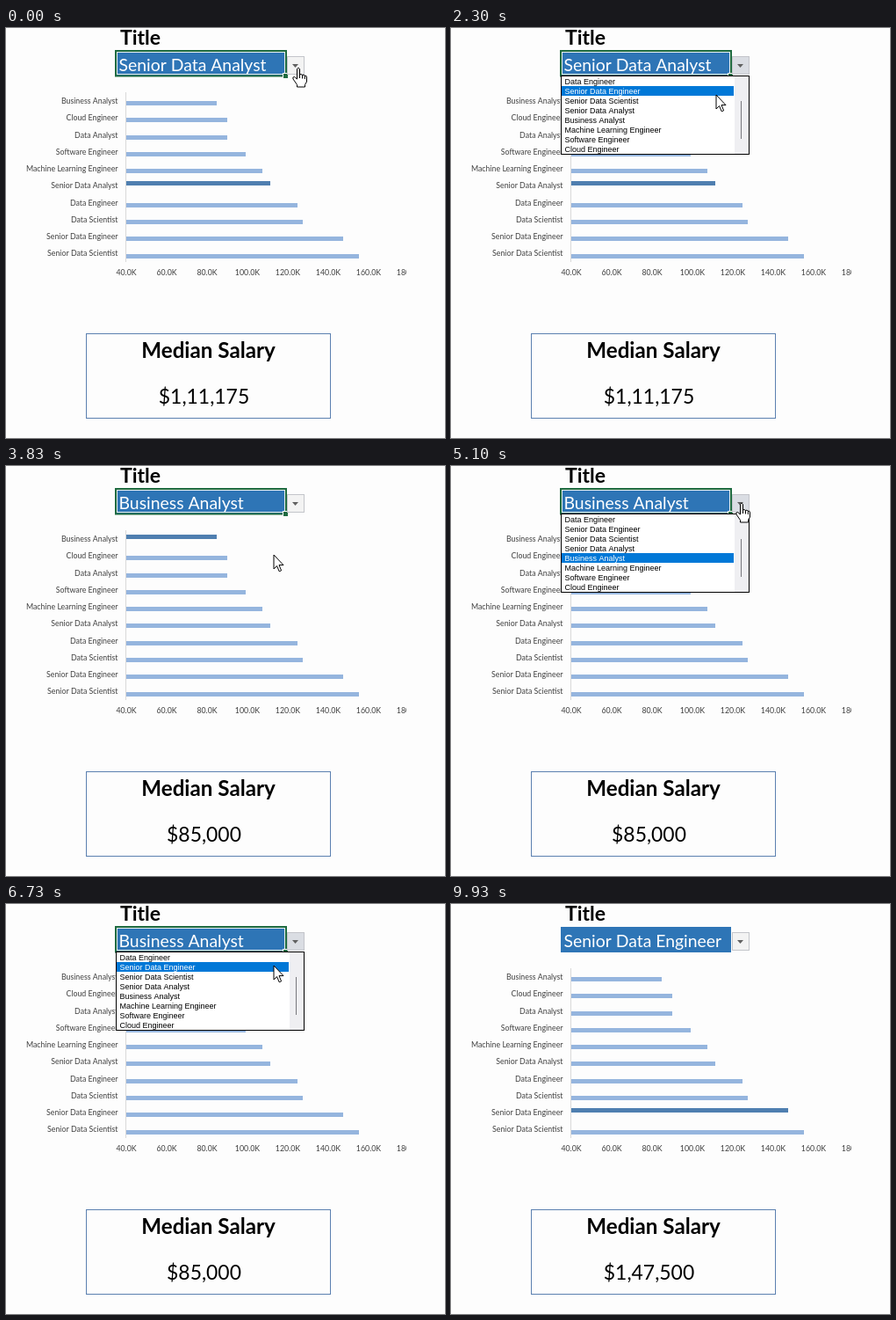
Write an HTML page with a canvas that moves like this. It is 500 px wide and 466 px high and loops after 9960 ms.

```html
<!DOCTYPE html>
<html lang="en">
<head>
<meta charset="utf-8">
<title>Median salary by title</title>
<style>
  html, body { margin: 0; width: 100%; height: 100%; overflow: hidden; background: #fdfdfd; }
  canvas { display: block; }
</style>
</head>
<body>
<canvas id="stage" width="500" height="466"></canvas>
<script>
const ctx = document.getElementById('stage').getContext('2d');
const LOOP = 9960;
const PAPER = '#fdfdfd';
const GREEN = '#1f6b41';
const SANS = 'Lato, sans-serif';
const LIST_FONT = '9px "Liberation Sans", Arial, sans-serif';

// Salaries in thousands, in chart order
const salaries = {
  'Business Analyst': 85, 'Cloud Engineer': 90, 'Data Analyst': 90,
  'Software Engineer': 99.2, 'Machine Learning Engineer': 107.5,
  'Senior Data Analyst': 111.175, 'Data Engineer': 125, 'Data Scientist': 127.5,
  'Senior Data Engineer': 147.5, 'Senior Data Scientist': 155
};
const options = ['Data Engineer', 'Senior Data Engineer', 'Senior Data Scientist',
  'Senior Data Analyst', 'Business Analyst', 'Machine Learning Engineer',
  'Software Engineer', 'Cloud Engineer'];

// Pointer stops: time, x, y
const pointerPath = [
  [0, 333, 45], [1000, 333, 45], [1700, 302, 76], [2500, 302, 76], [3000, 305, 101],
  [4200, 305, 101], [4700, 331, 42], [5500, 331, 42], [6100, 305, 70],
  [8200, 305, 70], [8800, 385, -25], [LOOP, 385, -25]
];
const openSpans = [[700, 3300], [4850, 7200]];
const blurTime = 9400;

const handShape = new Path2D('M-1.5 1.5Q0 -1 1.5 1.5V8Q3 6.8 4.5 8.5Q6 7.6 7.3 9.2Q9.5 8.6 9.5 11V16L7.5 19.5V22H-1.5V19.5L-6 13Q-7 10.5 -4.5 10.5L-1.5 13Z');
const handLines = new Path2D('M1.5 8V12M4.5 8.5V12.5M7.3 9.2V13');
const arrowShape = new Path2D('M0 0V16L3.6 12.6L6.2 18.8L8.6 17.8L6 11.6H11Z');

function rect(x, y, w, h, color) {
  ctx.fillStyle = color;
  ctx.fillRect(x, y, w, h);
}

function frame(x, y, w, h, color, width = 1) {
  ctx.strokeStyle = color;
  ctx.lineWidth = width;
  ctx.strokeRect(x, y, w, h);
}

function text(str, x, y, font, align = 'left', color = '#000') {
  ctx.font = font;
  ctx.textAlign = align;
  ctx.fillStyle = color;
  ctx.fillText(str, x, y);
}

function pointerAt(t) {
  const i = pointerPath.findIndex(p => p[0] > t);
  const [t0, x0, y0] = pointerPath[i - 1], [t1, x1, y1] = pointerPath[i];
  const u = (t - t0) / (t1 - t0), e = u * u * (3 - 2 * u);
  return { x: x0 + (x1 - x0) * e, y: y0 + (y1 - y0) * e };
}

function drawChart(selected) {
  rect(136, 73, 1, 193, '#d9d9d9');
  Object.entries(salaries).forEach(([name, value], i) => {
    const active = name === selected;
    text(name, 127.5, 86.2 + 19.23 * i, '8.8px ' + SANS, 'right', '#404040');
    rect(137, Math.round(82.95 + 19.3 * i) - (active ? 5 : 0), Math.round(2.3 * (value - 40)), 5,
      active ? '#4f7fb0' : '#95b5de');
  });
  ctx.save();
  ctx.beginPath();
  ctx.rect(0, 266, 456, 24);
  ctx.clip();
  for (let k = 40; k <= 180; k += 20)
    text(k.toFixed(1) + 'K', 137 + 2.3 * (k - 40), 281.3, '8.8px ' + SANS, 'center', '#404040');
  ctx.restore();
}

function drawCell(selected, open, focused) {
  rect(125, 26, 194, 29, '#2e75b6');
  if (focused) {
    frame(126.5, 27.5, 191, 25, '#e8f0ee');
    frame(125, 26, 194, 28.5, GREEN, 2);
    rect(315, 51, 6, 6, PAPER);
    rect(316, 52, 5, 5, GREEN);
  }
  text(selected, 128.5, 49, '19.4px ' + SANS, 'left', '#fff');

  rect(320, 32, 20, 21, open ? '#dadde3' : '#f3f3f3');
  frame(320.5, 32.5, 19, 20, '#c3c5ca');
  ctx.fillStyle = '#606060';
  ctx.beginPath();
  ctx.moveTo(326, 41);
  ctx.lineTo(333, 41);
  ctx.lineTo(329.5, 45);
  ctx.fill();
}

function drawList(selected, pointer) {
  const hovering = pointer.x < 322 && pointer.y >= 55 && pointer.y < 143;
  const active = hovering ? Math.floor((pointer.y - 55) / 11) : options.indexOf(selected);
  rect(125, 54, 215, 90, '#fff');
  rect(323, 55, 16, 88, '#efeff2');
  rect(330, 83, 1, 43, '#77777c');
  options.forEach((name, i) => {
    if (i === active) rect(126, 55 + 11 * i, 196, 11, '#0078d7');
    text(name, 129.5, 64 + 11 * i, LIST_FONT, 'left', i === active ? '#fff' : '#000');
  });
  frame(125.5, 54.5, 214, 89, '#000');
}

function drawPointer({ x, y }) {
  const hand = x > 319 && x < 341 && y > 32 && y < 54;
  const shape = hand ? handShape : arrowShape;
  ctx.save();
  ctx.translate(x, y);
  ctx.lineWidth = 1;
  ctx.strokeStyle = '#000';
  ctx.fillStyle = '#fff';
  ctx.fill(shape);
  ctx.stroke(shape);
  if (hand) ctx.stroke(handLines);
  ctx.restore();
}

function draw(t) {
  const selected = t < openSpans[0][1] ? 'Senior Data Analyst'
    : t < openSpans[1][1] ? 'Business Analyst' : 'Senior Data Engineer';
  const open = openSpans.some(([from, to]) => t >= from && t < to);
  const pointer = pointerAt(t);

  rect(0, 0, 500, 466, PAPER);
  text('Title', 130, 19, 'bold 23px ' + SANS);
  drawChart(selected);

  frame(91.5, 347.5, 278, 96, '#5b80b0');
  text('Median Salary', 230.5, 374.5, 'bold 24.2px ' + SANS, 'center');
  text('$' + Math.round(salaries[selected] * 1000).toLocaleString('en-IN'),
    225.5, 427, '22.9px ' + SANS, 'center');

  drawCell(selected, open, t < blurTime);
  if (open) drawList(selected, pointer);
  drawPointer(pointer);
}

function tick() {
  draw(performance.now() % LOOP);
  requestAnimationFrame(tick);
}
tick();
</script>
</body>
</html>
```
